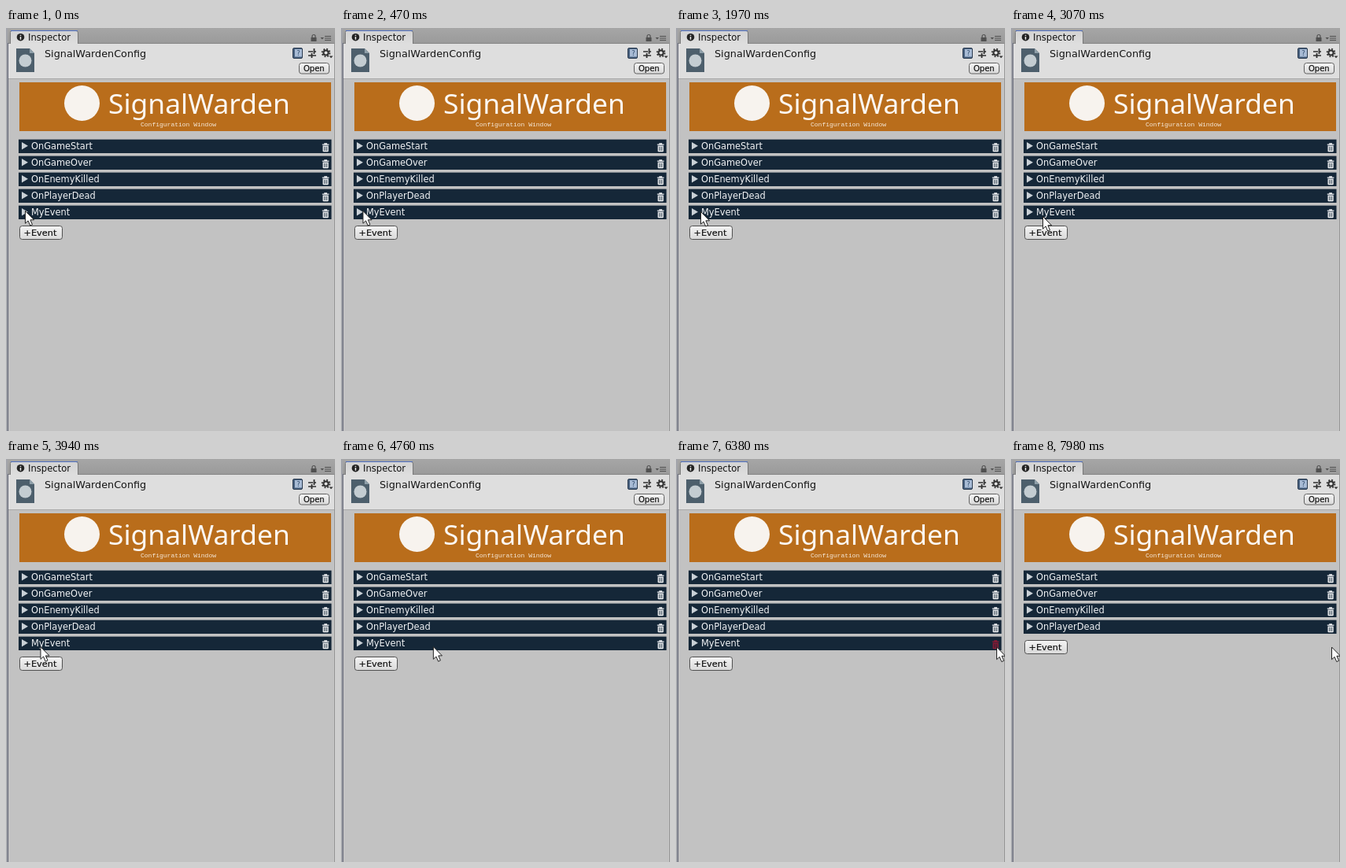
Animation of 418 by 512 pixels, one loop 8000 ms. Source, as an HTML page:

```html
<!DOCTYPE html>
<html lang="en">
<head>
<meta charset="utf-8">
<title>Inspector</title>
<style>
  html, body { margin: 0; width: 100%; height: 100%; overflow: hidden; background: #c2c2c2; }
  svg { display: block; width: 418px; height: 512px; font-family: "DejaVu Sans", sans-serif; }
  .label { fill: #111; stroke: #111; stroke-width: .2; }
</style>
</head>
<body>
<svg viewBox="0 0 418 512">
  <defs>
    <linearGradient id="bar" x2="0" y2="1">
      <stop stop-color="#a6a6a6"/><stop offset="1" stop-color="#9a9a9a"/>
    </linearGradient>
    <linearGradient id="tab" x2="0" y2="1">
      <stop stop-color="#d2d2d2"/><stop offset="1" stop-color="#dedede"/>
    </linearGradient>
    <linearGradient id="btn" x2="0" y2="1">
      <stop stop-color="#f4f4f4"/><stop offset="1" stop-color="#d9d9d9"/>
    </linearGradient>
    <g id="bin">
      <path d="M0 2H8.6M3 1.6V.6H5.6V1.6" fill="none" stroke="currentColor" stroke-width="1.2"/>
      <path d="M.7 3.3H7.9V10Q7.9 11 6.9 11H1.7Q.7 11 .7 10Z" fill="currentColor"/>
      <path d="M2.6 4.6V9.8M4.3 4.6V9.8M6 4.6V9.8" stroke="#152738" stroke-width=".7"/>
    </g>
  </defs>

  <rect width="418" height="512" fill="#c2c2c2"/>
  <rect width="418" height="20" fill="url(#bar)"/>
  <rect x="3" y="19" width="415" height="45" fill="#dedede"/>
  <path d="M3 64.5H418" stroke="#a8a8a8"/>
  <path d="M3 19.5H418" stroke="#858585"/>
  <rect width="2" height="512" fill="#a3a5ab"/>
  <path d="M2.5 19V512" stroke="#5c6070"/>
  <path d="M417.5 19V512" stroke="#969696"/>

  <path d="M5.5 20V5.5Q5.5 3.5 7.5 3.5H89Q91.5 3.5 91.5 6V20" fill="url(#tab)" stroke="#777"/>
  <path d="M6 3.5H91" stroke="#4f6fc0"/>
  <circle cx="18.5" cy="11.7" r="4.8" fill="#222"/>
  <path d="M18.5 8.7V10M18.5 11V14.7" stroke="#eee" stroke-width="1.5"/>
  <text x="28" y="15.7" font-size="11.6" fill="#111">Inspector</text>

  <g fill="none" stroke="#505050">
    <path d="M389 12V10.5A2 2 0 0 1 393 10.5V12" stroke-width="1.2"/>
    <rect x="387.5" y="12" width="7" height="5" fill="#505050" stroke="none"/>
    <path d="M405 10.5H413M405 13H413M405 15.5H413" stroke-width="1.2"/>
    <path d="M399.5 12H404L401.75 14.5Z" fill="#505050" stroke="none"/>
  </g>

  <path d="M13 26H30L36 32V56H13Z" fill="#4d5f6c"/>
  <path d="M30 26V32H36Z" fill="#8fa0aa"/>
  <circle cx="24.5" cy="41.5" r="8" fill="#c3ccd1"/>
  <text id="asset" x="49" y="37" font-size="12.8" fill="#151515"></text>

  <rect x="364.5" y="25.5" width="12" height="13" rx="1.5" fill="#48617f" stroke="#2b3b50"/>
  <rect x="367" y="27" width="9" height="9.5" fill="#a9bcd6"/>
  <text x="371.5" y="34.8" font-size="8.5" text-anchor="middle" fill="#35506f">?</text>
  <g stroke="#303030" fill="none">
    <path d="M384 30H390M384 35H388M389 35H394M391 30H394" stroke-width="1.6"/>
    <path d="M391.5 26V33M388.5 32V38" stroke-width="1.8"/>
    <circle cx="406.5" cy="31.5" r="3.1" stroke-width="2"/>
    <circle cx="406.5" cy="31.5" r="4.9" stroke-width="1.8" stroke-dasharray="1.9 1.95"/>
    <path d="M410.5 35.5H415.5L413 38.3Z" fill="#303030" stroke="none"/>
  </g>
  <rect x="372.5" y="44.5" width="38" height="13.5" rx="3" fill="url(#btn)" stroke="#606060"/>
  <text class="label" x="378" y="55" font-size="10">Open</text>

  <rect x="17" y="69" width="396" height="62" fill="#b96d1b"/>
  <circle cx="96.5" cy="95.5" r="22.5" fill="#f7f3ee"/>
  <text id="brand" x="130" y="109" font-size="35.4" fill="#fbf7f2" font-family="Noto Sans, sans-serif"></text>
  <text x="171" y="125" font-size="8" fill="#f6eadc" font-family="Liberation Mono, monospace">Configuration Window</text>

  <g id="rows"></g>
  <g id="add">
    <rect x="17.5" y="251.5" width="54" height="17" rx="3" fill="url(#btn)" stroke="#505050"/>
    <text class="label" x="22.5" y="264" font-size="11.3">+Event</text>
  </g>
  <path id="cursor" d="M.5 .5V16.2L4.1 12.9L6.7 19L9.5 17.8L6.9 11.8H11.6Z" fill="#fff" stroke="#222"/>
</svg>
<script>
const LOOP = 8000, DELETE_AT = 7050, PITCH = 21;
const brand = 'SignalWarden';
const events = ['OnGameStart', 'OnGameOver', 'OnEnemyKilled', 'OnPlayerDead', 'MyEvent'];
// time, x, y of the pointer tip
const path = [
  [0, 24, 232], [350, 25, 232], [970, 50, 232], [1970, 31, 233], [3070, 40, 239],
  [4200, 44, 238], [6150, 407, 238.5], [LOOP, 407, 238.5]
];

const $ = id => document.getElementById(id);
$('brand').textContent = brand;
$('asset').textContent = brand + 'Config';
$('rows').innerHTML = events.map((name, i) => `
  <g transform="translate(0 ${142 + i * PITCH})">
    <rect x="16" y="-.4" width="397.5" height="17.4" fill="#152738"/>
    <path d="M20 3V12.5L28 7.7Z" fill="#c9d0d6"/>
    <text x="32" y="12" font-size="11.4" fill="#f1f3f5">${name}</text>
    <use href="#bin" x="401.8" y="4.2" color="#eef0f2"/>
  </g>`).join('');
const lastRow = $('rows').lastElementChild;
const lastBin = lastRow.querySelector('use');

function pointer(t) {
  const i = path.findIndex(p => p[0] > t);
  const [t0, x0, y0] = path[i - 1], [t1, x1, y1] = path[i];
  const u = (t - t0) / (t1 - t0), e = u * u * (3 - 2 * u);
  return [x0 + (x1 - x0) * e, y0 + (y1 - y0) * e];
}

function draw(t) {
  const [x, y] = pointer(t);
  const gone = t >= DELETE_AT;
  $('cursor').setAttribute('transform', `translate(${x.toFixed(2)} ${y.toFixed(2)})`);
  lastRow.setAttribute('visibility', gone ? 'hidden' : 'visible');
  lastBin.setAttribute('color', x >= 401 ? '#8e1a34' : '#eef0f2');
  $('add').setAttribute('transform', `translate(0 ${gone ? -PITCH : 0})`);
}

const start = performance.now();
function tick() {
  draw((performance.now() - start) % LOOP);
  requestAnimationFrame(tick);
}
tick();
</script>
</body>
</html>
```
